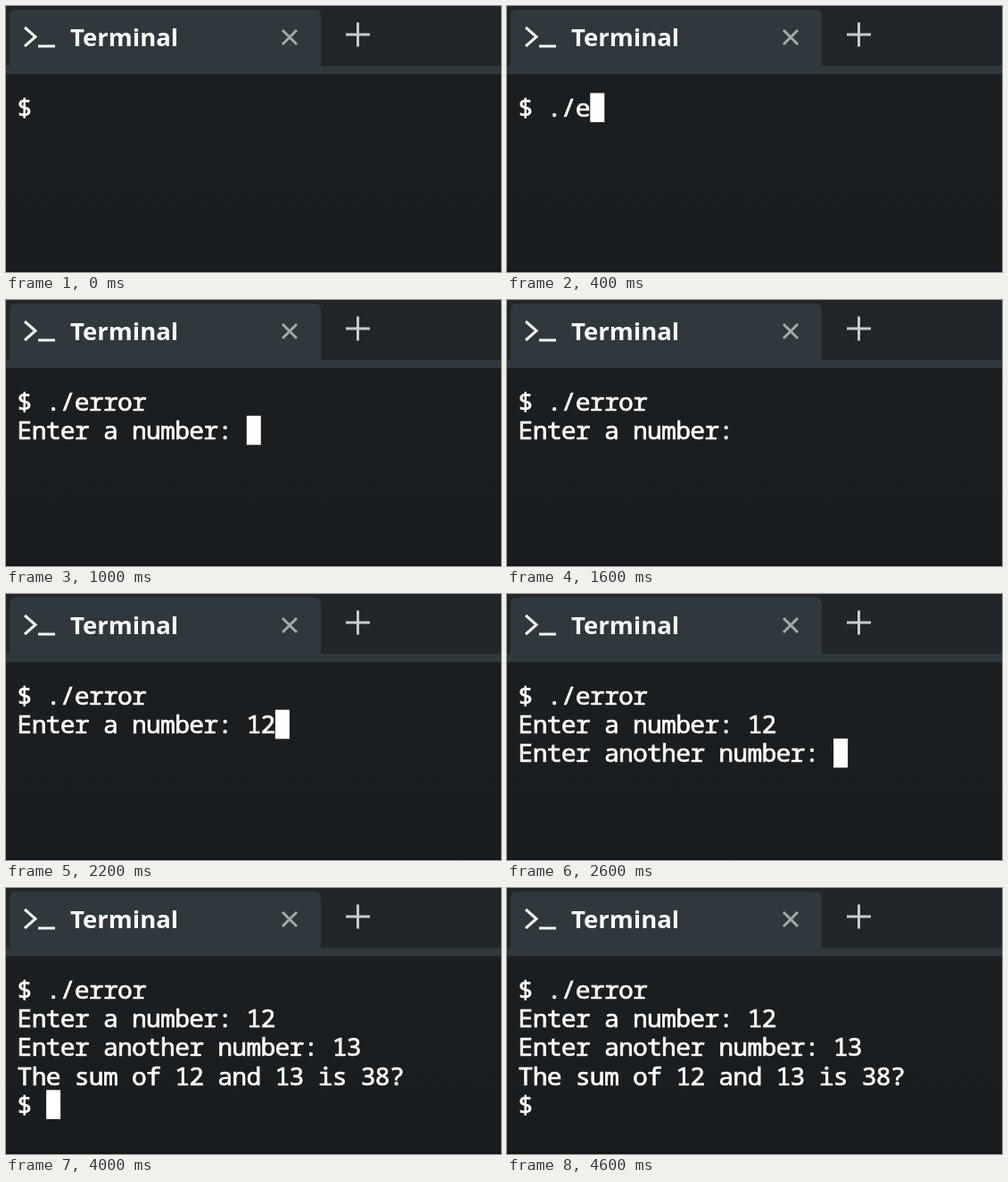
These frames come from a looping animation (555 by 298 pixels, 5100 ms). An HTML page:

```html
<!DOCTYPE html>
<html lang="en">
<head>
<meta charset="utf-8">
<title>Terminal</title>
<style>
  html, body { margin: 0; width: 100%; height: 100%; overflow: hidden; background: #1a1e21; }
  svg { display: block; width: 555px; height: 298px; }
  .soft { filter: blur(.45px); }
  .title { font: 700 27.5px "Open Sans", sans-serif; fill: #fafafa; }
  #screen { font: 28px "Noto Sans Mono", monospace; letter-spacing: -.75px; fill: #fff; stroke: #fff; stroke-width: .7; }
  #screen text { white-space: pre; }
  .icon { fill: none; stroke-width: 3; }
</style>
</head>
<body>
<svg viewBox="0 0 555 298">
  <defs>
    <linearGradient id="body" x2="0" y2="1">
      <stop offset="0" stop-color="#1b1f22"/>
      <stop offset="1" stop-color="#191d20"/>
    </linearGradient>
  </defs>
  <rect width="555" height="298" fill="url(#body)"/>
  <rect width="555" height="68" fill="#20262a"/>
  <g class="soft">
    <path d="M-2 67H4V11Q4 4 11 4H346Q353 4 353 11V67H557V76.3H-2Z" fill="#2f383d"/>
    <rect x="-2" y="296" width="559" height="4" fill="#17131a"/>
    <path class="icon" d="M21 24L33 34.5L21 45M36 45H55" stroke="#f4f5f5"/>
    <text class="title" x="72" y="45">Terminal</text>
    <path class="icon" d="M310 27L326 43M326 27L310 43" stroke="#a3a8aa"/>
    <path class="icon" d="M381 32H408M394.5 18.5V45.5" stroke="#c8cbcc"/>
    <g id="screen"></g>
    <rect id="cursor" width="16" height="32.6" fill="#fff"/>
  </g>
</svg>
<script>
const LOOP = 5100, LEFT = 13, COL = 16.05, ROW = 32.2;
const screen = document.getElementById('screen');
const cursor = document.getElementById('cursor');

// Each entry is [time, text appended to the screen].
const type = (start, text, step = 100) =>
  [...text].map((char, i) => [start + i * step, char]);

const output = [
  [0, '$ '],
  ...type(100, './'),
  ...type(400, 'error'),
  [1000, '\nEnter a number: '],
  ...type(2100, '12'),
  [2600, '\nEnter another number: '],
  ...type(3100, '13', 500),
  [4000, '\nThe sum of 12 and 13 is 38?\n$ '],
];

const cursorOn = t => t >= 100 && t < 4600 && !(t >= 1600 && t < 2100);

const rows = Array.from({ length: 5 }, (_, i) => {
  const row = document.createElementNS('http://www.w3.org/2000/svg', 'text');
  row.setAttribute('x', LEFT - 0.4);
  row.setAttribute('y', 124 + i * ROW);
  return screen.appendChild(row);
});

function draw(now) {
  const t = now % LOOP;
  const lines = output.filter(([at]) => at <= t).map(([, text]) => text).join('').split('\n');
  rows.forEach((row, i) => { row.textContent = lines[i] || ''; });
  const last = lines.length - 1;
  cursor.setAttribute('x', LEFT + lines[last].length * COL);
  cursor.setAttribute('y', 97.5 + last * ROW);
  cursor.setAttribute('visibility', cursorOn(t) ? 'visible' : 'hidden');
}

function tick() {
  draw(performance.now());
  requestAnimationFrame(tick);
}
tick();
</script>
</body>
</html>
```
